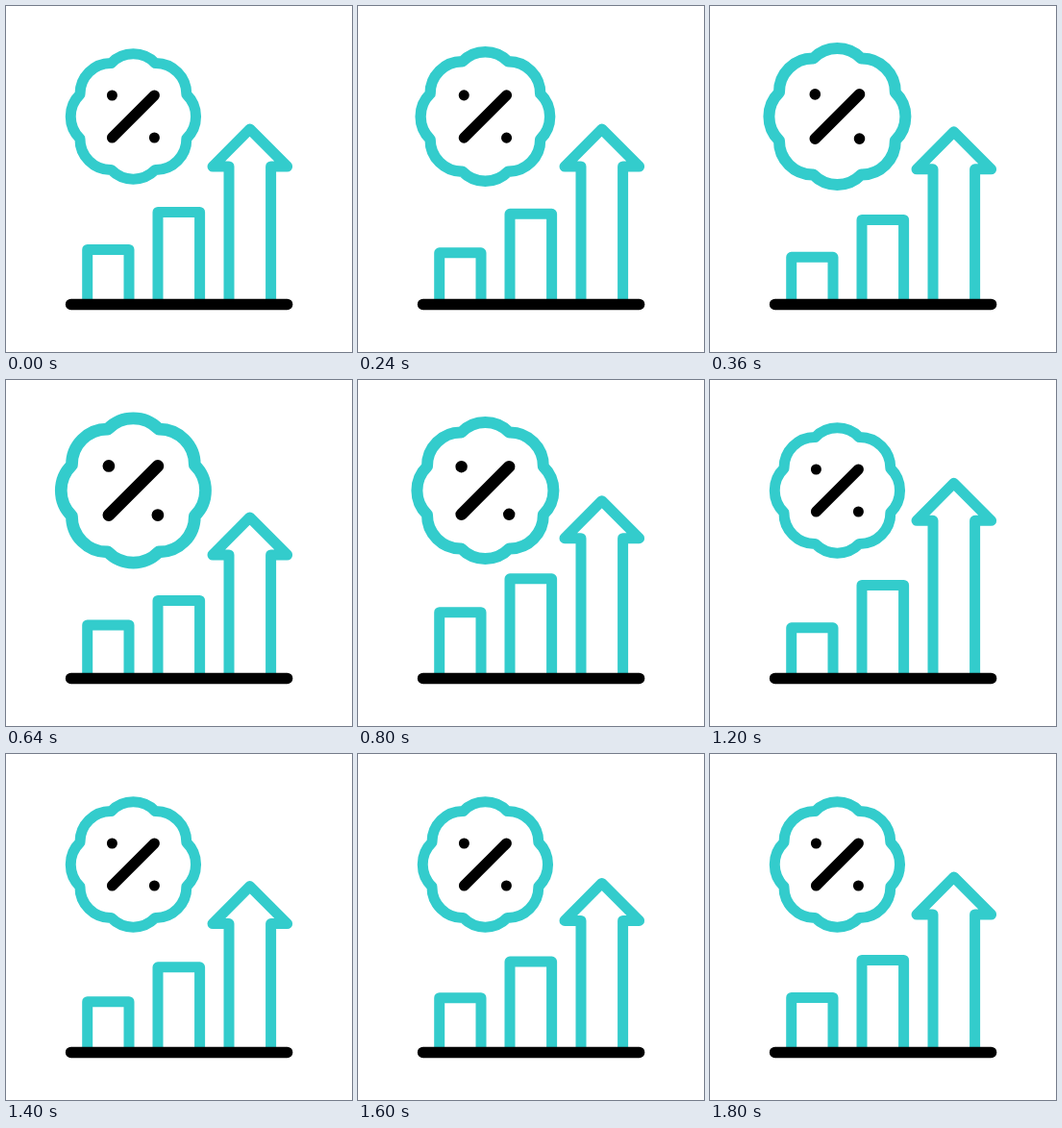
Recreate the animation shown at these times as an HTML page. Size 360 by 360 pixels, loop 2000 ms.

```html
<!DOCTYPE html>
<html lang="en">
<head>
<meta charset="utf-8">
<title>Growing rate</title>
<style>
  html, body { margin: 0; width: 100%; height: 100%; overflow: hidden; background: #fff; }
  svg { display: block; width: 100%; height: 100%; }
  path { fill: none; stroke-width: 11; stroke-linecap: round; stroke-linejoin: round; }
  .teal { stroke: #33cccc; }
  .black { stroke: #000; }
</style>
</head>
<body>
<svg viewBox="0 0 360 360">
  <clipPath id="ground"><rect width="360" height="310"/></clipPath>
  <path id="badge" class="teal"/>
  <path id="percent" class="black" d="M-22 22L22-22M-22-22h.01M22 22h.01"/>
  <g class="teal" clip-path="url(#ground)">
    <path id="low" d="M84.7 400V253.5H128V400"/>
    <path id="mid" d="M158 400V214.5H201.6V400"/>
    <path id="arrow" d="M232 400V167H215L253.7 128L292.6 167H275.6V400"/>
  </g>
  <path class="black" style="stroke-width:11.5" d="M67.6 310.4H292.6"/>
</svg>
<script>
  const LOOP = 2000, STEP = 40;
  const CENTER = "132.4 115";
  const byId = id => document.getElementById(id);

  // Eight round lobes meeting in shallow valleys.
  function scallop(lobes, valley, radius) {
    const point = i => {
      const a = (i + 0.5) * 2 * Math.PI / lobes;
      return (valley * Math.cos(a)).toFixed(2) + " " + (valley * Math.sin(a)).toFixed(2);
    };
    let d = "M" + point(0);
    for (let i = 1; i <= lobes; i++) d += `A${radius} ${radius} 0 0 1 ${point(i)}`;
    return d + "Z";
  }

  // Eased value at time t through [time, value] keys.
  function track(keys, t) {
    if (t <= keys[0][0]) return keys[0][1];
    for (let i = 1; i < keys.length; i++) {
      const [t0, a] = keys[i - 1], [t1, b] = keys[i];
      if (t < t1) {
        const u = (t - t0) / (t1 - t0);
        return a + (b - a) * u * u * (3 - 2 * u);
      }
    }
    return keys[keys.length - 1][1];
  }

  const scales = {
    badge: [[100, 1], [580, 1.16], [1060, 1]],
    percent: [[180, 1], [660, 1.16], [1140, 1]]
  };
  const shifts = {
    low: [[90, 0], [475, 10], [895, -15], [1265, 6], [1640, 0]],
    mid: [[150, 0], [590, 17], [960, -24], [1330, 8], [1710, 0]],
    arrow: [[250, 0], [645, 15], [1045, -37], [1440, 11], [1800, 0]]
  };

  function draw(now) {
    const t = Math.floor(now % LOOP / STEP) * STEP;
    for (const id in scales)
      byId(id).setAttribute("transform", `translate(${CENTER}) scale(${track(scales[id], t)})`);
    for (const id in shifts)
      byId(id).setAttribute("transform", `translate(0 ${track(shifts[id], t)})`);
  }

  function tick() {
    draw(performance.now());
    requestAnimationFrame(tick);
  }

  byId("badge").setAttribute("d", scallop(8, 60, 32));
  tick();
</script>
</body>
</html>
```
